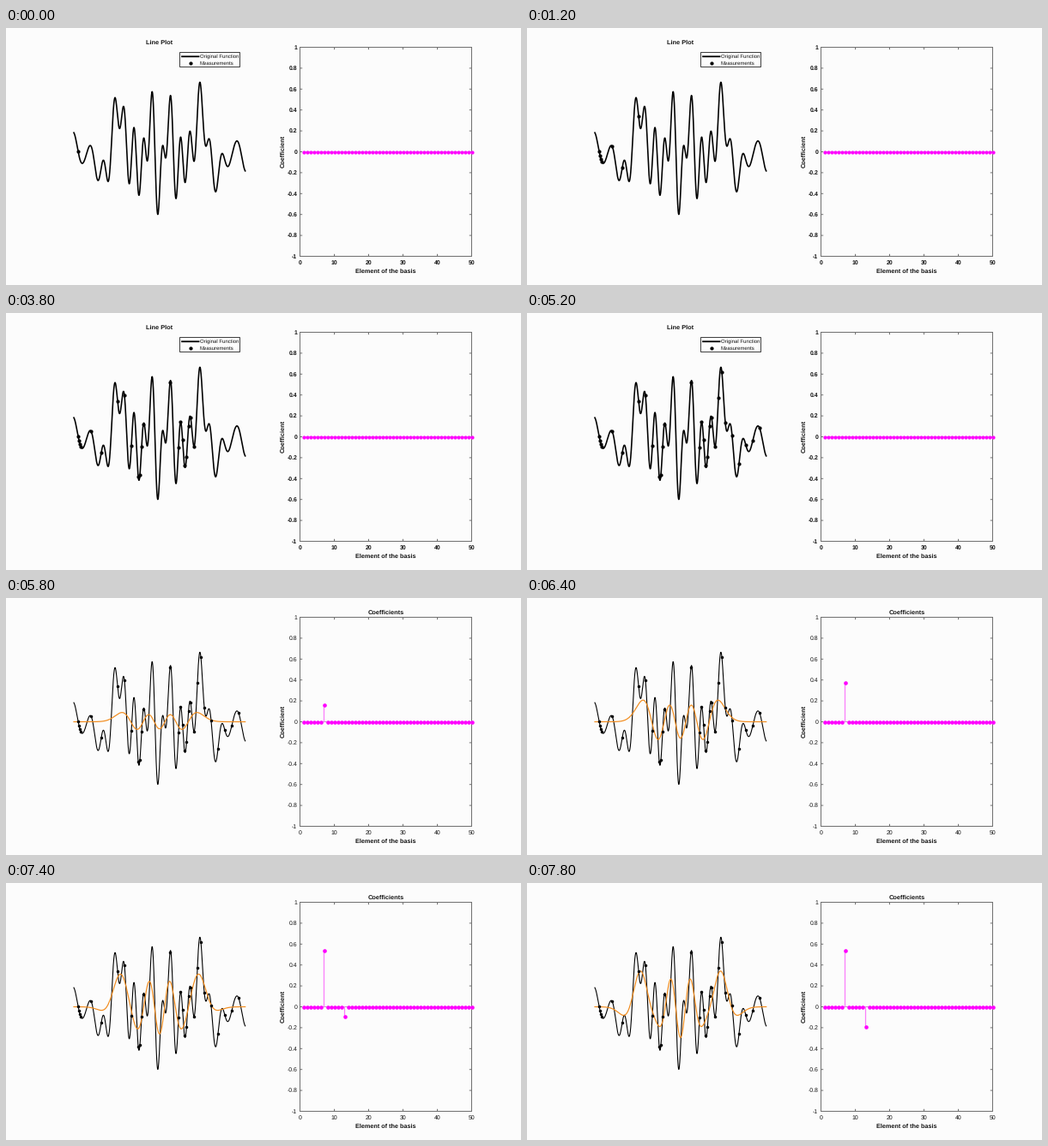
Recreate the animation shown at these times as a matplotlib script. Size 600x300 px, loop 8 s.

```python
import numpy as np
import matplotlib.pyplot as plt
from matplotlib.animation import FuncAnimation
from matplotlib.patches import Rectangle

W, H, DPI = 600, 300, 100
FRAMES, INTERVAL = 40, 200
PX = 72 / DPI                      # points per pixel
BG, AXIS, MAGENTA, ORANGE = "#fcfcfc", "#707070", "#ff00ff", "#f28c1e"

LEFT, RIGHT, TOP, BOTTOM = 342.5, 542.5, 22.5, 266.5
MID_Y, UNIT = (TOP + BOTTOM) / 2, (BOTTOM - TOP) / 2
X0, X1, SPAN = 79.0, 278.7, 7      # the function is drawn over [-SPAN, SPAN]

# The function is a sparse sum of Hermite functions: element -> weight.
TERMS = {7: 0.535, 13: -0.488, 34: 0.66, 38: 0.4}
GROW = 10                          # steps for one weight to build up
COUNT = 30                         # number of measurements

plt.rcParams["font.family"] = "Liberation Sans"
plt.rcParams["text.hinting"] = "none"
fig = plt.figure(figsize=(W / DPI, H / DPI), dpi=DPI, facecolor=BG)
ax = fig.add_axes([0, 0, 1, 1])
ax.set_xlim(0, W)
ax.set_ylim(H, 0)
ax.axis("off")


def hermite(n, u):
    """Normalised Hermite function of degree n."""
    prev, cur = np.zeros_like(u), np.pi ** -0.25 * np.exp(-u * u / 2)
    for k in range(n):
        prev, cur = cur, (np.sqrt(2 / (k + 1)) * u * cur
                          - np.sqrt(k / (k + 1)) * prev)
    return cur


def level(v):
    return MID_Y - UNIT * v


def column(k):
    return LEFT + (RIGHT - LEFT) * k / 50


def combine(weights, x):
    """Screen height of a weighted sum of basis elements."""
    u = SPAN * (2 * x - X0 - X1) / (X1 - X0)
    return level(sum(c * hermite(n - 1, u) for n, c in weights.items()))


def text(x, y, s, size, weight="bold", **kw):
    kw = {"ha": "center", "va": "center", "color": "#111111", **kw}
    return ax.text(x, y, s, fontsize=size * PX, weight=weight, **kw)


def line(x, y, color, width, z=2):
    return ax.plot(x, y, color=color, lw=width * PX, zorder=z, snap=False)[0]


def dots(x, y, color, size):
    return ax.plot(x, y, "o", color=color, ms=size * PX, mew=0, zorder=5,
                   snap=False)[0]


def box(x0, y0, x1, y1, color):
    return ax.add_patch(Rectangle((x0, y0), x1 - x0, y1 - y0, fc="none",
                                  ec=color, lw=PX, zorder=1, snap=False))


# Left panel
xs = np.linspace(X0, X1, 1200)
samples = np.interp(np.arange(COUNT),
                    [0, 3, 5, 6, 9, 12, 13, 14, 20, 24, 29],
                    [84, 87, 111, 130, 154, 160, 191, 201, 215, 231, 271])
heights = combine(TERMS, samples)
wave = line(xs, combine(TERMS, xs), "black", 1.6)
fit = line([], [], ORANGE, 1.2, z=4)
marks = dots([], [], "black", 4.2)
intro = [
    text(179, 16.8, "Line Plot", 7.4),
    box(202.5, 28.5, 272.5, 45.5, "#404040"),
    line([205, 224.5], [33.3, 33.3], "black", 1.8),
    dots([214.7], [41.3], "black", 4.2),
    text(226, 33.5, "Original Function", 5.95, "normal", ha="left"),
    text(226, 41.3, "Measurements", 5.95, "normal", ha="left"),
]

# Right panel
box(LEFT, TOP, RIGHT, BOTTOM, AXIS)
ticks = []
for k in range(0, 51, 10):
    x = column(k)
    for edge, inner in ((BOTTOM, -2.2), (TOP, 2.2)):
        line([x, x], [edge, edge + inner], AXIS, 1)
    ticks.append(text(x, 274.5, str(k), 6.9))
for k in range(-5, 6):
    y = level(k / 5)
    for edge, inner in ((LEFT, 2.2), (RIGHT, -2.2)):
        line([edge, edge + inner], [y, y], AXIS, 1)
    ticks.append(text(339.3, y + 0.5, f"{k / 5:g}", 6.9, ha="right"))
text(442.5, 284, "Element of the basis", 7.3)
text(322.6, 144.2, "Coefficient", 7.4, rotation=90)
title = text(442.5, 16.9, "Coefficients", 7.4)

cols = column(np.arange(1, 51))
line([cols[0], cols[-1]], [MID_Y, MID_Y], "#b066b0", 0.7)
stems = {n: line([], [], "#fb7cfb", 1.2, z=3) for n in TERMS}
heads = dots(cols, np.full(50, MID_Y), MAGENTA, 4.2)


def update(frame):
    tick = frame * 9 // 8
    step = max(tick - (COUNT - 1), 0)
    fitting = step > 0

    marks.set_data(samples[:tick + 1], heights[:tick + 1])
    marks.set_markersize((3.5 if fitting else 4.2) * PX)
    wave.set_linewidth((1.1 if fitting else 1.6) * PX)
    heads.set_markersize((4.6 if fitting else 4.2) * PX)
    for item in intro:
        item.set_visible(not fitting)
    for label in ticks:
        label.set_weight("normal" if fitting else "bold")
    title.set_visible(fitting)
    fit.set_visible(fitting)

    # Weights build up one after another.
    weights = {n: c * np.clip(step / GROW - i, 0, 1)
               for i, (n, c) in enumerate(TERMS.items())}
    bars = np.zeros(50)
    for n, c in weights.items():
        bars[n - 1] = c
        stems[n].set_data([column(n)] * 2, [MID_Y, level(c)])
    heads.set_data(cols, level(bars))
    fit.set_data(xs, combine(weights, xs))
    return [wave, fit, marks, heads, title, *stems.values(), *intro, *ticks]


anim = FuncAnimation(fig, update, frames=FRAMES, interval=INTERVAL,
                     init_func=lambda: update(0), repeat=True,
                     repeat_delay=0, blit=False)
plt.show()
```
